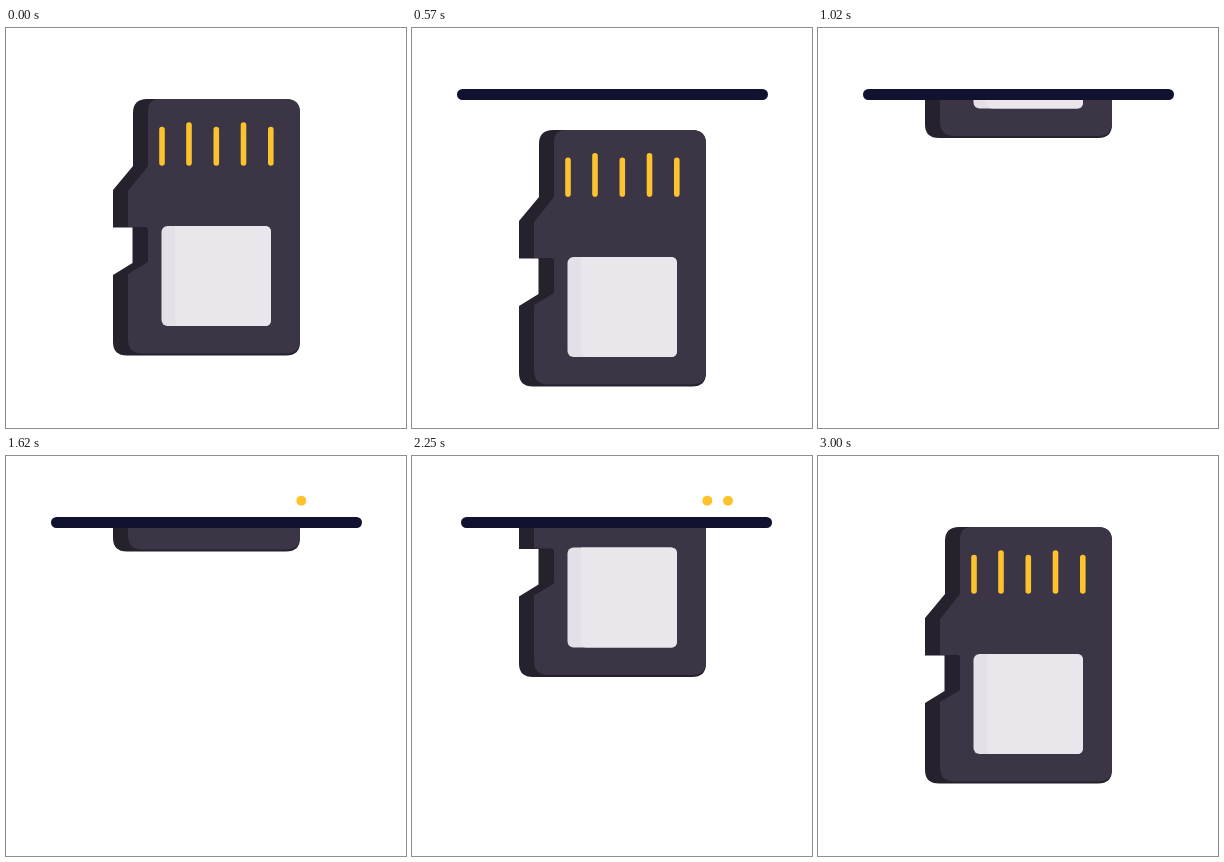
Recreate the animation shown at these times as an HTML page. Size 400 by 400 pixels, loop 4090 ms.

```html
<!DOCTYPE html>
<html lang="en">
<head>
<meta charset="utf-8">
<title>Memory card</title>
<style>
  html, body { margin: 0; width: 100%; height: 100%; overflow: hidden; background: #fff; }
  svg { display: block; width: 100%; height: 100%; }
</style>
</head>
<body>
<svg viewBox="0 0 400 400">
  <clipPath id="below"><rect y="66" width="400" height="334"/></clipPath>
  <g clip-path="url(#below)">
    <g id="card">
      <path fill="#25212d" d="M141 71H280Q294 71 294 85V314Q294 327.5 280 327.5H121Q107 327.5 107 314V247L126.500 235V199.500H107V162L127 138V85Q127 71 141 71Z"/>
      <path fill="#3b3546" d="M154 71H280Q294 71 294 85V312Q294 325.500 280 325.500H136Q122 325.500 122 311V246L142 234V202Q142 199 139 199H122V163L142 138V83Q142 71 154 71Z"/>
      <rect x="155.500" y="198" width="109.500" height="100" rx="6" fill="#e5dfe8"/>
      <path fill="#eae6ec" d="M169 198H259Q265 198 265 204V292Q265 298 259 298H175Q169 298 169 292Z"/>
      <path stroke="#fdc32f" stroke-width="5.600" stroke-linecap="round" d="M156 101.500V135M183 97V135M210.300 101.500V135M237.500 97V135M264.800 101.500V135"/>
    </g>
  </g>
  <rect id="slot" y="61" height="11" rx="5.500" fill="#10122f"/>
  <g fill="#fdc32f">
    <circle id="lampA" cx="295.300" cy="44.800" r="5"/>
    <circle id="lampB" cx="316" cy="44.800" r="5"/>
  </g>
</svg>
<script>
const STEP = 30, LOOP = 4090, LAST = 100;
const $ = id => document.getElementById(id);
const card = $('card'), slot = $('slot'), lampA = $('lampA'), lampB = $('lampB');

const clamp = v => Math.min(1, Math.max(0, v));
const ease = (t, from, to) => {
  const u = clamp((t - from) / (to - from));
  return u * u * (3 - 2 * u);
};

// Dip, slide into the slot, come back with a small overshoot, settle.
const cardY = t =>
  56 * ease(t, 0, 15) - 288 * ease(t, 15, 37) +
  257 * ease(t, 65.6, 84.7) - 25 * ease(t, 86.8, 100);

// The leading end of the slot enters fast; the trailing end leaves fast.
function slotEnds(t) {
  const before = Math.max(0, 18 - t);
  const left = 45 - 0.218 * before ** 2 + 0.0386 * Math.max(0, t - 70.3) ** 3;
  const right = 356 - 0.0686 * before ** 3 + 0.218 * Math.max(0, t - 70.7) ** 2;
  return [left, right];
}

const pulse = (t, on, off) => ease(t, on, on + 4) - ease(t, off, off + 4);

function draw(t) {
  card.setAttribute('transform', `translate(0 ${cardY(t)})`);
  const [left, right] = slotEnds(t);
  slot.setAttribute('x', left);
  slot.setAttribute('width', Math.max(0, right - left));
  lampA.setAttribute('r', 5 * pulse(t, 34, 76));
  lampB.setAttribute('r', 5 * (pulse(t, 39, 50) + pulse(t, 57, 76)));
}

const start = performance.now();
function tick() {
  const time = (performance.now() - start) % LOOP;
  draw(Math.min(LAST, Math.floor(time / STEP)));
  requestAnimationFrame(tick);
}
tick();
</script>
</body>
</html>
```
